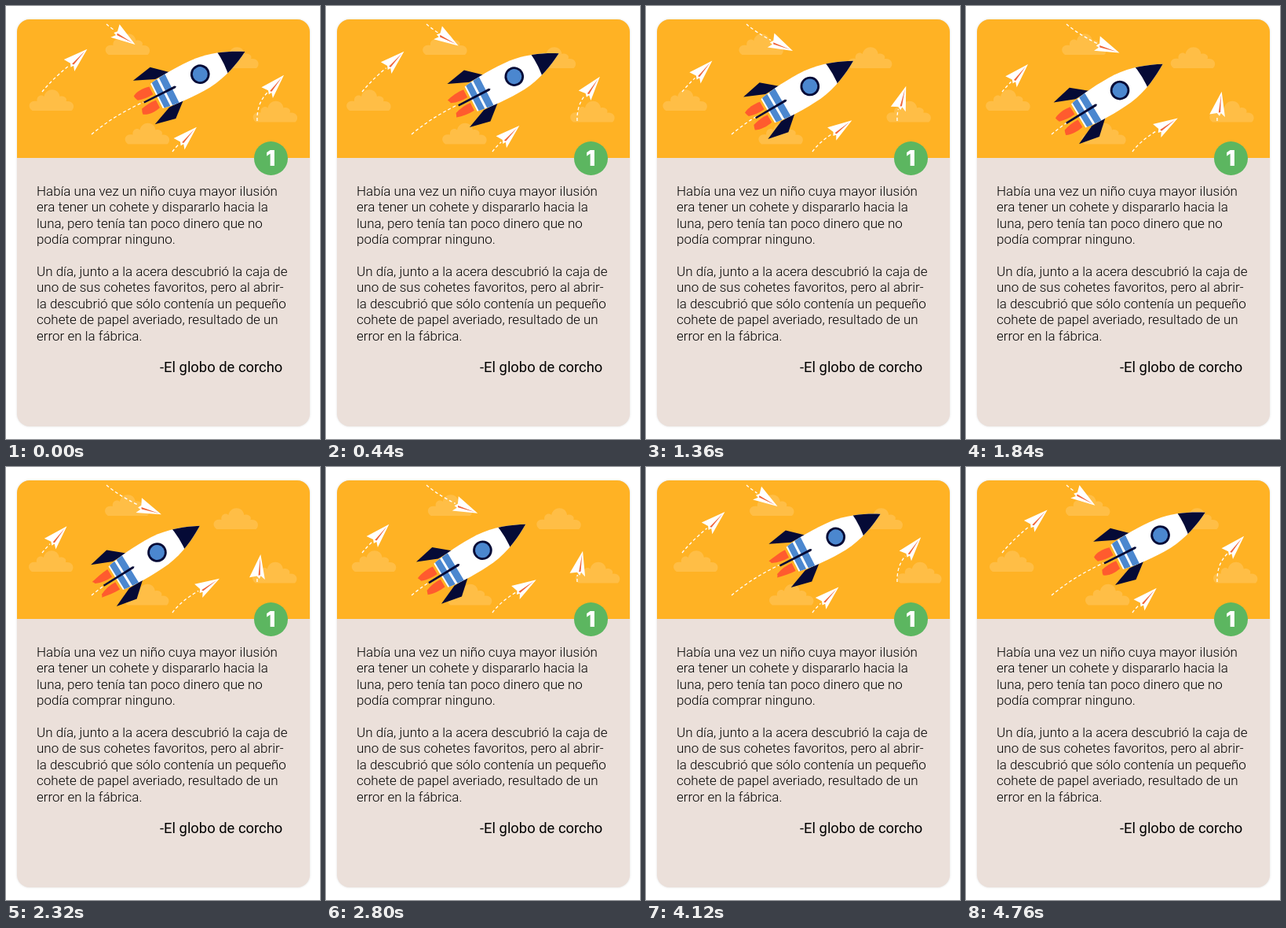
Write an HTML page with a canvas that moves like this. It is 400 by 550 pixels and loops after 4800 ms.

```html
<!DOCTYPE html>
<html lang="es">
<head>
<meta charset="utf-8">
<style>
  html, body { margin: 0; width: 100%; height: 100%; overflow: hidden; background: #fff; }
  .stage { position: relative; width: 400px; height: 550px; font-family: Roboto, sans-serif; color: #000; }
  .stage > * { position: absolute; margin: 0; white-space: nowrap; }
  .card {
    left: 14px; top: 17px; width: 373px; height: 517px; border-radius: 16px;
    background: #ebe0da; overflow: hidden; box-shadow: 0 0 3px rgba(0, 0, 0, .13);
  }
  canvas { display: block; }
  .badge {
    left: 315.5px; top: 172px; width: 43px; height: 43px; border-radius: 50%;
    background: #5cb660; color: #fff; font: 900 27px/43px Inter, sans-serif; text-align: center;
  }
  .story { left: 39px; top: 225px; font-size: 17px; line-height: 20.4px; font-weight: 300; }
  .title { left: 196px; top: 449px; font-size: 18.4px; line-height: 20px; }
</style>
</head>
<body>
<div class="stage">
  <div class="card"><canvas id="sky" width="373" height="176"></canvas></div>
  <div class="badge">1</div>
  <p class="story">Había una vez un niño cuya mayor ilusión<br>
    era tener un cohete y dispararlo hacia la<br>
    luna, pero tenía tan poco dinero que no<br>
    podía comprar ninguno.<br><br>
    Un día, junto a la acera descubrió la caja de<br>
    uno de sus cohetes favoritos, pero al abrir-<br>
    la descubrió que sólo contenía un pequeño<br>
    cohete de papel averiado, resultado de un<br>
    error en la fábrica.</p>
  <p class="title">-El globo de corcho</p>
</div>
<script>
const LOOP = 4800, STEP = 40, TAU = Math.PI * 2;
const SKY = '#ffb224', CLOUD = '#ffbe46', NAVY = '#050a36', BLUE = '#4b87cf', FLAME = '#ff5b2e';
const ctx = document.getElementById('sky').getContext('2d');

const clouds = [[29.5, 133], [126.5, 62], [265, 79], [314.5, 147.5], [151.5, 175.5]];

// path: start, control, end; s and deg: value at the low end and change to the high end
const planes = [
  { path: [[46, 109], [58, 94], [81, 75]], s: [.36, .635], deg: [-46.4, 4.4] },
  { path: [[128, 23], [143, 36], [170, 49]], s: [.987, -.67], deg: [22, 12.5] },
  { path: [[320, 146], [319, 122], [336, 107]], s: [.09, .815], deg: [-82, 36] },
  { path: [[212, 185], [222, 171], [244, 158]], s: [1.028, -.683], deg: [-30, -14] }
];
const wake = { path: [[109, 163], [136, 140], [177, 121]], s: [.31, .67] };

const mix = (a, b, k) => a.map((v, i) => v + (b[i] - v) * k);
const at = ([base, change], u) => base + change * u;

function shape(color, points) {
  ctx.fillStyle = color;
  ctx.beginPath();
  points.forEach(p => ctx.lineTo(...p));
  ctx.closePath();
  ctx.fill();
}

function disc(color, x, y, r) {
  ctx.fillStyle = color;
  ctx.beginPath();
  ctx.arc(x, y, r, 0, TAU);
  ctx.fill();
}

function placed(x, y, deg, draw) {
  ctx.save();
  ctx.translate(x, y);
  ctx.rotate(deg * Math.PI / 180);
  draw();
  ctx.restore();
}

function cloud(x, y) {
  ctx.fillStyle = CLOUD;
  ctx.beginPath();
  ctx.moveTo(x + 4, y);
  ctx.bezierCurveTo(x - 3, y - 5, x, y - 14, x + 10, y - 12);
  ctx.bezierCurveTo(x + 9, y - 20, x + 17, y - 21, x + 19, y - 18);
  ctx.bezierCurveTo(x + 21, y - 29, x + 37, y - 30, x + 39, y - 18);
  ctx.bezierCurveTo(x + 45, y - 20, x + 49, y - 15, x + 47, y - 12);
  ctx.bezierCurveTo(x + 57, y - 13, x + 59, y - 4, x + 54, y);
  ctx.fill();
}

// Dashed line along the first part of a curve; returns its end
function trail([a, c, b], s) {
  const mid = mix(a, c, s), end = mix(mid, mix(c, b, s), s);
  ctx.strokeStyle = '#fff';
  ctx.lineWidth = 1.3;
  ctx.setLineDash([4, 3]);
  ctx.beginPath();
  ctx.moveTo(...a);
  ctx.quadraticCurveTo(...mid, ...end);
  ctx.stroke();
  ctx.setLineDash([]);
  return end;
}

function plane() {
  shape('#fff', [[31, 0], [0, -10], [3, -1], [0, 3], [4, 4], [0, 10]]);
  shape('#f0643a', [[27, 0], [4, 1], [5, 3.2]]);
}

function flame(side, point) {
  const end = -88 - 2 * point, bend = 4 * point;
  ctx.fillStyle = FLAME;
  ctx.beginPath();
  ctx.moveTo(-65, side * 4);
  ctx.lineTo(-65, side * 15);
  ctx.bezierCurveTo(-73, side * (17 - bend / 2), -82, side * (17 - bend), end, side * (13 - bend / 3));
  ctx.quadraticCurveTo(-88, side * 10, end + 2, side * (6 + bend / 2));
  ctx.quadraticCurveTo(-76, side * 3, -65, side * 4);
  ctx.fill();
}

function hull() {
  ctx.beginPath();
  ctx.moveTo(64, 0);
  ctx.bezierCurveTo(48, -9, 28, -18, 4, -20.5);
  ctx.bezierCurveTo(-20, -22, -42, -21, -62, -17.5);
  ctx.lineTo(-62, 17.5);
  ctx.bezierCurveTo(-42, 21, -20, 22, 4, 20.5);
  ctx.bezierCurveTo(28, 18, 48, 9, 64, 0);
}

function rocket(point) {
  for (const side of [-1, 1]) {
    flame(side, point);
    shape(NAVY, [[-80, 31], [-53, 36.5], [-34, 20], [-54, 20]].map(([x, y]) => [x, y * side]));
  }
  ctx.save();
  hull();
  ctx.fillStyle = '#fff';
  ctx.fill();
  ctx.clip();
  ctx.fillStyle = BLUE;
  ctx.fillRect(-60, -25, 8, 50);
  ctx.fillRect(-49, -25, 9, 50);
  ctx.fillStyle = NAVY;
  ctx.beginPath();
  ctx.moveTo(31, -22);
  ctx.quadraticCurveTo(35, 0, 31, 22);
  ctx.lineTo(70, 22);
  ctx.lineTo(70, -22);
  ctx.fill();
  ctx.restore();
  shape(NAVY, [[-80, -1.2], [-36, -1.5], [-34, 0], [-36, 1.5], [-80, 1.2]]);
  disc(NAVY, 0, 0, 12.3);
  disc(BLUE, 0, 0, 9.5);
}

function draw(t) {
  const turn = TAU * t / LOOP;
  const drift = -9.5 * Math.asin(Math.sin(turn)) * 2 / Math.PI;
  const u = (1 + Math.cos(turn + TAU * 160 / LOOP)) / 2;
  const point = (1 - Math.cos(turn * 3)) / 2;

  ctx.setTransform(1, 0, 0, 1, -14, -17);
  ctx.fillStyle = SKY;
  ctx.fillRect(14, 17, 373, 176);
  clouds.forEach(([x, y]) => cloud(x + drift, y));
  for (const p of planes) {
    const tail = trail(p.path, at(p.s, u));
    placed(...tail, at(p.deg, u), plane);
  }
  trail(wake.path, at(wake.s, u));
  placed(192.3 + 55.6 * u, 108.6 - 22.2 * u, -31.8 + 5.2 * u, () => rocket(point));
}

const start = performance.now();
function tick() {
  const t = (performance.now() - start) % LOOP;
  draw(Math.floor(t / STEP) * STEP);
  requestAnimationFrame(tick);
}
tick();
</script>
</body>
</html>
```
